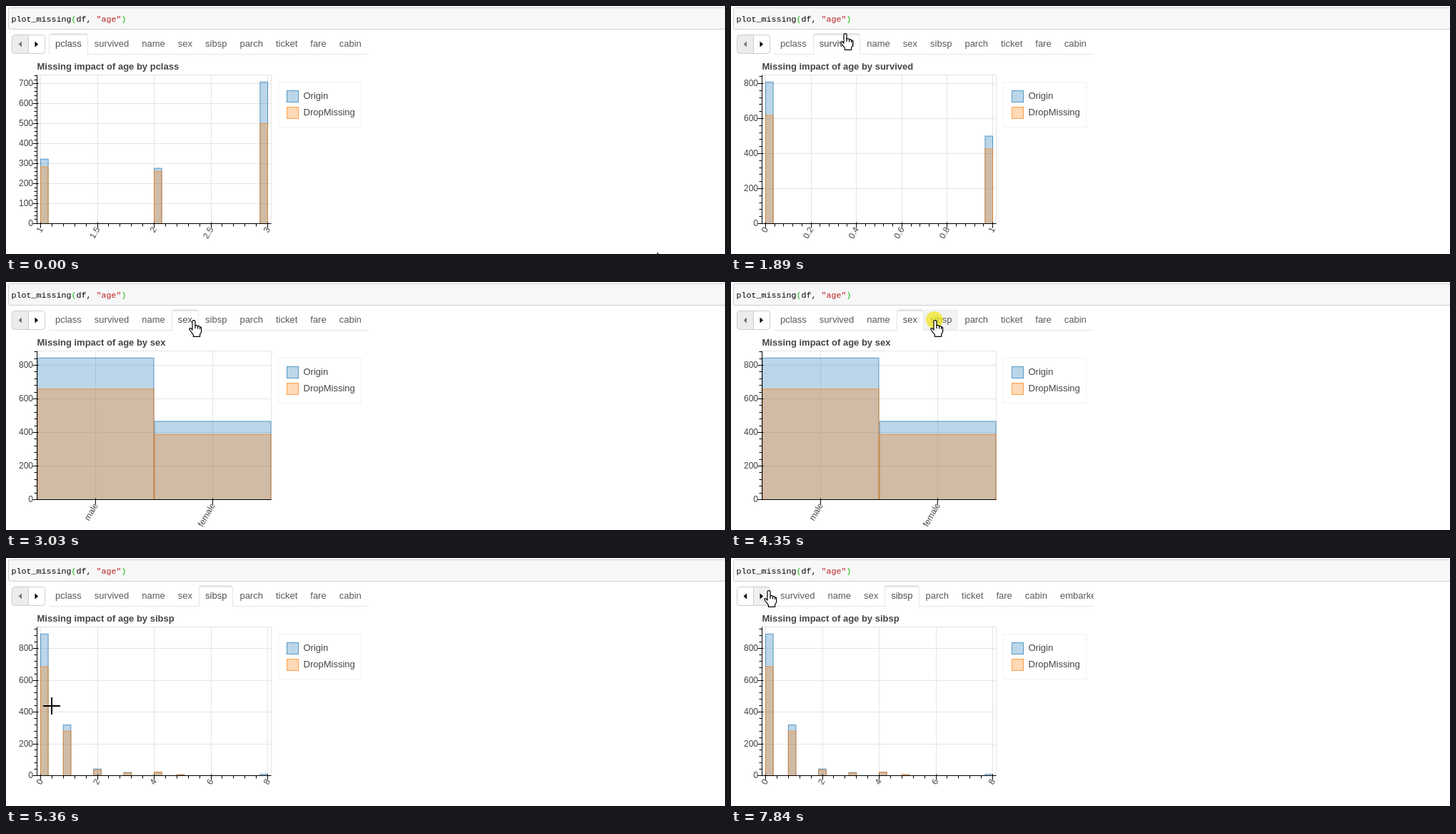
Recreate the animation shown at these times as an HTML page. Size 1007 by 347 pixels, loop 8000 ms.

```html
<!DOCTYPE html>
<html lang="en">
<head>
<meta charset="utf-8">
<title>plot_missing</title>
<style>
  html, body { margin: 0; width: 100%; height: 100%; overflow: hidden; background: #fff; }
  body, svg { font-family: "Liberation Sans", Arial, sans-serif; }
  svg { position: absolute; left: 0; top: 0; }
  #tabs {
    position: absolute; left: 60px; top: 38px; width: 448px; height: 30px;
    display: flex; overflow: hidden; box-shadow: inset 0 -1px #e6e6e6;
  }
  #tabs span {
    flex: none; box-sizing: border-box; height: 29px; padding: 0 8px;
    border: solid transparent; border-width: 3px 1px 0; border-radius: 4px 4px 0 0;
    font-size: 13px; line-height: 24px; color: #5a5a5a;
  }
  #tabs .active { height: 30px; background: #fff; border-color: #e6e6e6; color: #4d4d4d; }
  #tabs .pressed { background: #f2f2f2; }
  .code { font: 11.667px "Liberation Mono", monospace; white-space: pre; }
  .title { font-size: 13px; font-weight: bold; fill: #444; }
  .tick { font-size: 12px; fill: #444; text-anchor: end; }
  .legend { font-size: 13px; fill: #444; }
  .grid { stroke: #e5e5e5; fill: none; }
  .axis { stroke: #000; fill: none; }
  .origin { fill: #1f77b4; stroke: #1f77b4; fill-opacity: .3; stroke-opacity: .7; }
  .drop { fill: #ff7f0e; stroke: #ff7f0e; fill-opacity: .3; stroke-opacity: .7; }
  .key { font-size: 12px; fill: #26aae1; text-anchor: end; }
  .value { font-size: 12px; fill: #2f2f2f; }
</style>
</head>
<body>
<div id="tabs"></div>
<svg width="1007" height="347" viewBox="0 0 1007 347">
  <rect x="3.5" y="2.5" width="1010" height="30" rx="2" fill="#f7f7f7" stroke="#cfcfcf"/>
  <text class="code" x="7.5" y="21.5">plot_missing<tspan fill="#0b0">(</tspan>df, <tspan fill="#ba2121">"age"</tspan><tspan fill="#0b0">)</tspan></text>

  <path id="prev" d="M31.5 40.5H12.5a4 4 0 0 0-4 4v18a4 4 0 0 0 4 4h19z" stroke="#ccc"/>
  <path id="next" d="M31.5 40.5h19a4 4 0 0 1 4 4v18a4 4 0 0 1-4 4h-19z" stroke="#ccc"/>
  <path id="prevArrow" d="M17.5 53.5l4.5-4v8z"/>
  <path d="M45 53.5l-4.5-4v8z"/>

  <g id="plots"></g>

  <rect x="381.5" y="106.5" width="116" height="63" fill="none" stroke="#e5e5e5" stroke-opacity=".5"/>
  <rect class="origin" x="393.5" y="118.5" width="16" height="16"/>
  <rect class="drop" x="393.5" y="141.5" width="16" height="16"/>
  <text class="legend" x="416.5" y="130">Origin</text>
  <text class="legend" x="416.5" y="153">DropMissing</text>

  <g id="tooltip"></g>
  <circle id="halo" r="12" fill="#f0e61e" fill-opacity=".75"/>
  <g id="cursor">
    <path id="arrow" d="M.5.5v16l3.8-3.6 2.8 6 2.2-1-2.7-5.7h5.2z" fill="#fff" stroke="#000"/>
    <path id="beam" d="M-3-8h2.2L0-7l.8-1H3M0-7V7M-3 8h2.2L0 7l.8 1H3" fill="none" stroke="#000"/>
    <path id="cross" d="M-12 0h24M0-12v24" fill="none" stroke="#000" stroke-width="2"/>
    <g id="hand" stroke="#000" stroke-width="1.2" stroke-linejoin="round">
      <path d="M-1 2q0-1.4 2-1.4T3 2v6q3-1 3.6.8 2.6-.6 3 1 2.2-.2 2 2.2v4q0 2-2 4.200V23.400H.4v-2.600L-4.800 14q-1-2.600 1.300-2.400L-1 14z" fill="#fff"/>
      <path d="M3 7v5M6.600 9v3.500M9.600 10v3" fill="none"/>
    </g>
  </g>
</svg>
<script>
const LOOP = 8000;
const $ = id => document.getElementById(id);
const LEFT = 43.5, RIGHT = 371.5, TOP = 96.5, BASE = 304.5;
const snap = v => Math.floor(v) + .5;

const tabNames = ["pclass", "survived", "name", "sex", "sibsp", "parch", "ticket", "fare", "cabin", "embarked"];
$("tabs").innerHTML = tabNames.map(n => `<span>${n}</span>`).join("");
const tabs = [...$("tabs").children];
const scrollBy = tabs[0].getBoundingClientRect().width;

// Numeric bars: [bin of 30, all rows, rows kept]; categories use the bin as an index.
const charts = [
  { tab: 0, from: 0, yStep: 100, min: 1, max: 3, xStep: .5,
    bars: [[0, 323, 284], [15, 277, 261], [29, 709, 501]] },
  { tab: 1, from: 1540, yStep: 200, min: 0, max: 1, xStep: .2,
    bars: [[0, 809, 619], [29, 500, 427]] },
  { tab: 3, from: 3030, yStep: 200, labels: ["male", "female"],
    bars: [[0, 843, 658], [1, 466, 388]] },
  { tab: 4, from: 4430, yStep: 200, min: 0, max: 8, xStep: 2,
    bars: [[0, 891, 685], [3, 319, 280], [7, 42, 36], [11, 20, 16], [15, 22, 22], [18, 6, 6], [29, 9, 0]] }
];

function drawChart(c) {
  const scale = 198.2 / Math.max(...c.bars.map(b => b[1]));
  const yOf = v => BASE - v * scale;
  const xOf = v => 48.5 + 318 * (v - c.min) / (c.max - c.min);
  let grid = "", axis = "", text = "", bars = "";

  const xTick = (x, label) => {
    grid += `M${snap(x)} ${TOP}V${BASE}`;
    axis += `M${snap(x)} ${BASE - 2}v8`;
    text += `<text class="tick" transform="translate(${x} 310) rotate(-60)" dy=".36em">${label}</text>`;
  };

  for (let i = 0; yOf(i * c.yStep / 5) > TOP; i++) {
    const v = i * c.yStep / 5, y = snap(yOf(v));
    if (i % 5) { axis += `M${LEFT} ${y}h-4`; continue; }
    grid += `M${LEFT} ${y}H${RIGHT}`;
    axis += `M${LEFT + 2} ${y}h-8`;
    text += `<text class="tick" x="38" y="${y - .5}" dy=".36em">${v}</text>`;
  }

  if (c.labels) {
    c.labels.forEach((l, i) => xTick(125.5 + 164 * i, l));
  } else {
    const n = Math.round((c.max - c.min) / c.xStep * 5);
    for (let i = 0; i <= n; i++) {
      const v = c.min + i * c.xStep / 5;
      if (i % 5) axis += `M${snap(xOf(v))} ${BASE}v4`;
      else xTick(xOf(v), +v.toFixed(1));
    }
  }

  ["origin", "drop"].forEach((cls, k) => {
    for (const b of c.bars) {
      const [x, w] = c.labels ? [44 + 164 * b[0], 163] : [48.5 + 10.6 * b[0], 10.6];
      const h = b[k + 1] * scale;
      bars += `<rect class="${cls}" x="${x}" y="${BASE - h}" width="${w}" height="${h}"/>`;
    }
  });

  return `<g><text class="title" x="43.5" y="89">Missing impact of age by ${tabNames[c.tab]}</text>
    <path class="grid" d="M${LEFT} ${TOP}H${RIGHT}V${BASE}H${LEFT}z${grid}"/>${bars}
    <path class="axis" d="M${LEFT} ${TOP}V${BASE}H${RIGHT}${axis}"/>${text}</g>`;
}
$("plots").innerHTML = charts.map(drawChart).join("");
const plots = [...$("plots").children];

const tipRows = [["Origin", 891], ["DropMissing", 685]].flatMap(([label, n]) =>
  [["sibsp", "[0.0~0.27]"], ["Frequency", n], ["Label", label]]);
$("tooltip").innerHTML = `<rect x="67.5" y="137.5" width="144" height="135" rx="5" fill="#fff" stroke="#e5e5e5"/>
  <path d="M57 205l10-7v14z" fill="#909599"/>
  <path d="M73 205.500h132" stroke="#ccc" stroke-dasharray="3"/>` +
  tipRows.map(([k, v], i) => {
    const y = 157 + 19 * i + (i > 2 ? 9 : 0);
    return `<text class="key" x="136" y="${y}">${k}:</text><text class="value" x="140" y="${y}">${v}</text>`;
  }).join("");

// Pointer moves: start, time of last step, steps, way points.
const moves = [
  [70, 840, 11, [[780, 260], [610, 160], [440, 70], [290, 12], [180, 22], [109, 47]]],
  [920, 1150, 4, [[142, 49]]],
  [1700, 2410, 10, [[155, 41], [176, 27], [225, 25], [262, 53]]],
  [3970, 3970, 1, [[280, 53]]],
  [4120, 4180, 2, [[285, 53]]],
  [5050, 5360, 5, [[210, 90], [110, 170], [64, 207]]],
  [5670, 5670, 1, [[57, 207]]],
  [6610, 6610, 1, [[66, 207]]],
  [6760, 7440, 10, [[100, 170], [134, 110], [100, 62], [40, 42], [52, 45]]]
];

function along(pts, p) {
  const f = p * (pts.length - 1), i = Math.min(Math.floor(f), pts.length - 2);
  return pts[i].map((v, k) => Math.round(v + (pts[i + 1][k] - v) * (f - i)));
}

function pointerAt(t) {
  let pos = [912, 345];
  for (const [start, end, n, pts] of moves) {
    if (t < start) break;
    const step = n > 1 ? Math.min(n - 1, Math.floor((t - start) / (end - start) * (n - 1) + 1e-6)) : 0;
    pos = along([pos, ...pts], (step + 1) / n);
  }
  return pos;
}

function pointerKind(x, y) {
  if (y < 34) return "beam";
  if (y >= 37 && y < 68 && x > 8 && x < 508) return "hand";
  if (x > LEFT && x < RIGHT && y > TOP && y < BASE) return "cross";
  return "arrow";
}

// Clicks: from, to, tab shown as pressed.
const clicks = [[1390, 1540, -1], [2960, 3030, 3], [4350, 4430, 4], [7760, 7840, -1]];
const show = (el, on) => { el.style.display = on ? "" : "none"; };

function render(t) {
  const current = charts.filter(c => t >= c.from).pop();
  const click = clicks.find(c => t >= c[0] && t < c[1]);
  const scrolled = t >= 7840;

  charts.forEach((c, i) => show(plots[i], c === current));
  tabs.forEach((el, i) => {
    el.className = i === current.tab ? "active" : click && click[2] === i ? "pressed" : "";
  });
  tabs[0].style.marginLeft = scrolled ? -scrollBy + "px" : 0;
  $("prev").setAttribute("fill", scrolled ? "#fff" : "#ececec");
  $("prevArrow").setAttribute("fill", scrolled ? "#000" : "#777");
  $("next").setAttribute("fill", t >= 7760 ? "#f0f0f0" : "#fff");

  const [x, y] = pointerAt(t), kind = pointerKind(x, y);
  const place = `translate(${x} ${y})`;
  $("cursor").setAttribute("transform", place);
  $("halo").setAttribute("transform", place);
  for (const k of ["arrow", "beam", "cross", "hand"]) show($(k), k === kind);
  show($("halo"), click);
  show($("tooltip"), t >= 5670 && t < 6610);
}

function tick() {
  render(performance.now() % LOOP);
  requestAnimationFrame(tick);
}
tick();
</script>
</body>
</html>
```
